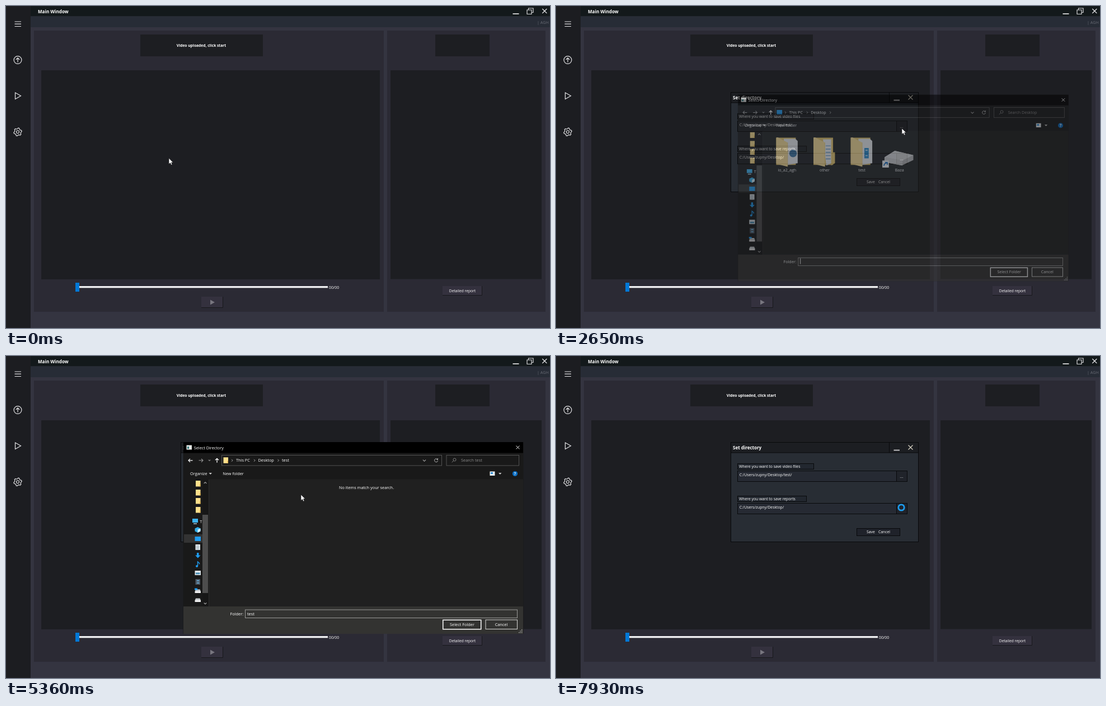
An HTML page for the animation above (8 s loop, 972 px wide and 576 px high).

```html
<!DOCTYPE html>
<html lang="en">
<head>
<meta charset="utf-8">
<title>Main Window</title>
<style>
html, body { margin: 0; width: 100%; height: 100%; overflow: hidden; background: #343440; }
svg { display: block; width: 100vw; height: 100vh; font-family: "Open Sans", "Noto Sans", sans-serif; }
</style>
</head>
<body>
<svg id="stage" viewBox="0 0 972 576"></svg>
<script>
const LOOP = 8000;

// Markup helpers
const rect = (x1, y1, x2, y2, fill, stroke = 'none') => {
  const o = stroke === 'none' ? 0 : 0.5;
  return `<rect x="${x1 + o}" y="${y1 + o}" width="${x2 - x1 - 2 * o}" height="${y2 - y1 - 2 * o}" fill="${fill}" stroke="${stroke}"/>`;
};
const line = (d, stroke, w = 1) => `<path d="${d}" fill="none" stroke="${stroke}" stroke-width="${w}"/>`;
const shape = (d, fill) => `<path d="${d}" fill="${fill}"/>`;
const text = (x, y, s, size = 6.8, fill = '#fff', extra = '') =>
  `<text x="${x}" y="${y + size * 0.36}" font-size="${size}" fill="${fill}" ${extra}>${s}</text>`;
const group = (id, body) => `<g id="${id}">${body}</g>`;
const BOLD = 'font-weight="700"', MID = 'text-anchor="middle"';
const cross = (x, y, r, c, w = 1) =>
  line(`M${x - r} ${y - r}l${2 * r} ${2 * r}M${x + r} ${y - r}l${-2 * r} ${2 * r}`, c, w);

function gear(x, y) {
  let d = '';
  for (let i = 0; i < 24; i++) {
    const a = (i + 0.5) * Math.PI / 12, r = i % 4 < 2 ? 7.2 : 5.6;
    d += `${i ? 'L' : 'M'}${(x + r * Math.sin(a)).toFixed(2)} ${(y - r * Math.cos(a)).toFixed(2)}`;
  }
  return line(d + 'Z', '#e4e4e6', 1.2) + `<circle cx="${x}" cy="${y}" r="2.5" fill="none" stroke="#e4e4e6" stroke-width="1.1"/>`;
}

function mainWindow() {
  const dark = '#1d1e22', panel = '#2b2a34', icon = '#e4e4e6';
  const button = (x1, y1, x2, y2) => rect(x1, y1, x2, y2, '#34313e') +
    line(`M${x1} ${y2 - 0.5}H${x2 - 0.5}V${y1}`, '#17171b');
  return rect(0, 0, 972, 576, '#343440') +
    rect(0, 0, 44, 576, '#1c1d21') +
    rect(44, 0, 972, 18.5, '#13191b') +
    rect(44, 18.5, 972, 38, '#272c36') +
    rect(50, 44, 675, 547, panel) + rect(681, 44, 964, 547, panel) +
    rect(240, 51, 459, 90, dark) + rect(767, 51, 864, 90, dark) +
    rect(63, 115, 668, 489, dark) + rect(687, 115, 957, 488.5, dark) +
    text(57, 9.7, 'Main Window', 8.05, '#fff', BOLD) +
    text(349, 70.7, 'Video uploaded, click start', 6.7, '#fff', BOLD + MID) +
    text(949, 29, '| AGH', 7.2, '#686b74') +
    line('M905.5 14H916.5', '#d8d8da', 1.8) +
    line('M931 7h8v7.500h-8zM933.500 7v-3h8.500v7.500h-3', '#d8d8da', 1.2) +
    cross(962.3, 9, 4, '#e4e4e6', 1.2) +
    line('M15.500 28h11.500M15.500 32.200h11.500M15.500 36.500h11.500', icon, 1.2) +
    `<circle cx="21" cy="96.500" r="6.900" fill="none" stroke="${icon}" stroke-width="1.200"/>` +
    line('M21 100.500v-7.500M17.800 96l3.200-3.200 3.200 3.200', icon, 1.2) +
    line('M16.500 155v11.500l10-5.700z', icon, 1.2) + gear(21, 225.3) +
    rect(127, 501, 575, 504.3, '#f0f0f2') + rect(124, 495, 131, 511, '#0078d7') +
    text(577, 503.2, '00/00') +
    button(349, 520, 388, 540) + shape('M365 525.500v9l8-4.500z', '#78767f') +
    button(780, 501, 851, 518) + text(815.5, 509.8, 'Detailed report', 6.7, '#fff', MID);
}

function settingsDialog() {
  const pathRow = (y, label, w, path) =>
    rect(324, y - 13, 324 + w, y - 2, '#22272f', '#08090b') + text(327, y - 7.3, label) +
    rect(324, y, 609, y + 20, '#262a33', '#08090b') + text(327.7, y + 8, path) +
    rect(608, y, 628, y + 20, '#20232a', '#08090b') + text(617.5, y + 10, '...', 8, '#ddd', MID);
  return rect(312, 154, 648, 333, '#282d34', '#08090b') +
    rect(312, 154, 648, 173.5, '#1c1e22', '#08090b') + line('M595.5 154V173', '#08090b') +
    text(316, 164, 'Set directory', 8, '#fff', BOLD) +
    line('M603.500 168.500h10.500', '#d0d0d2', 1.8) + cross(633.5, 163.5, 4, '#ded8c8', 1.1) +
    pathRow(205, 'Where you want to save video files', 137, 'C:/Users/zupny/Desktop/test/') +
    pathRow(263, 'Where you want to save reports', 124, 'C:/Users/zupny/Desktop/') +
    rect(537, 308, 615, 322, '#1f222a', '#08090b') +
    text(555, 315, 'Save') + text(576, 315, 'Cancel');
}

const smallFolder = (x, y) => rect(x - 4, y - 5, x + 4.5, y + 5.5, '#ffe08c') + rect(x + 3, y + 1, x + 4.5, y + 5.5, '#e0b44c');

// Open folder with papers; x is its left edge
const bigFolder = (x, inner) => shape(`M${x} 233h36v50h-36z`, '#e9c667') + inner +
  shape(`M${x} 233l3-.5 18 9.500v44.500l-21-5.500z`, '#ffe297') +
  line(`M${x + 21} 242v44`, '#f0cd74', 0.8);
const paper = x => shape(`M${x + 14} 235h21l4.500 4v41l-25 4z`, '#f4f5f6');

function treeIcons() {
  const blue = '#1f9cf0', pale = '#dfe6ea';
  const drive = y => shape(`M339 ${y - 2.5}h7.500l1.500 3.500h-10.500z`, '#c9cdd0') + rect(337.5, y + 1, 348, y + 4, '#f0f0f0');
  return [228, 244, 259, 275].map(y => smallFolder(343, y)).join('') +
    rect(333, 291, 343, 298, '#3db4f5') + line('M335 300h6', '#b9d9ea', 1.4) + text(346.3, 296, 'T', 7.3) +
    shape('M337.500 308.500l5-2.500 5 2.500v5l-5 2.500-5-2.500z', '#35aeea') + shape('M342.500 310.500l5-2v5l-5 2.500z', '#d5f2ff') +
    rect(318, 319, 351, 334, '#333') + rect(337.5, 323, 348, 331, blue) +
    rect(338.5, 337, 347, 347, pale) + line('M340 340h5M340 342.500h5M340 345h5', '#7d93a0', 0.8) +
    shape('M341 352h3.500v4.500h3l-4.700 5-4.700-5h2.900z', blue) +
    line('M342.500 376v-8l3 2.500v2', blue, 1.4) + `<circle cx="341" cy="376" r="2" fill="${blue}"/>` +
    rect(337.5, 384, 348, 392, pale) + rect(339, 387.5, 346.5, 390.5, '#4a90b8') +
    rect(338.5, 399, 347, 409, '#4e5a66') + line('M341 402h4M341 406h4', '#6cb8e6', 1.6) +
    drive(420) + shape('M337 415.500h5v3h-5z', blue) + drive(436);
}

function driveIcon() {
  return shape('M586 269l19-12 34 8v9l-21 10-32-6z', '#b9b9b9') +
    shape('M586 269l19-12 34 8-20 10z', '#dedede') + shape('M586 269l33 6v9l-33-6z', '#cfcfcf') +
    rect(582, 275, 594, 288, '#f5f7f9') + line('M585 285c0-4 2-5 5-5.500M587 278.500h4.200v4.200', '#1470c8', 1.6);
}

function fileDialog() {
  const s = 7.35, chev = (x, y) => line(`M${x - 1} ${y - 2}l2 2-2 2`, '#bbb', 0.9);
  const down = (x, y, r, c) => line(`M${x - r} ${y - r / 2}l${r} ${r} ${r}-${r}`, c, 1.1);
  const caption = (x, label) => text(x, 293, label, s, '#fff', MID);
  return rect(316.5, 154, 924.5, 497, '#191919') +
    rect(317, 154, 924, 173.5, '#000') +
    rect(363, 220.5, 924, 448, '#202020') + line('M362.500 221V448', '#2c2c2c') +
    rect(317, 448, 924, 497, '#333331') +
    group('chrome', rect(322.5, 159.5, 332, 167.5, '#e4e6e4') + rect(324, 162, 327, 166, '#3c7f80') + cross(914.5, 163.5, 2.9, '#fff')) +
    `<text id="heading" y="166.600" font-size="7.300" fill="#fff">Select Directory</text>` +
    `<path id="back" d="M333.500 186.800h-7.500m3-3l-3 3 3 3" fill="none" stroke-width="1.200"/>` +
    line('M344.500 186.800h7.500m-3-3l3 3-3 3', '#9a9a9a', 1.1) + down(363.5, 186.5, 1.8, '#888') +
    line('M377 190.800v-7.500m-3 3l3-3 3 3', '#fff', 1.3) +
    rect(385, 177, 779, 196.5, '#191919', '#535353') + rect(786.5, 177, 917, 196.5, '#191919', '#535353') +
    group('crumbHover', rect(446, 178, 482, 195.5, '#3a3a3a')) +
    chev(404, 186.8) + text(411, 186.5, 'This PC', s) + chev(444, 186.8) +
    text(450.5, 186.5, 'Desktop', s) + chev(486.5, 186.8) +
    down(747.5, 187, 2.6, '#aaa') +
    line('M771 184.900a3 3 0 1 0 .6 2.200M771.500 183v2.300h-2.300', '#c8c8c8', 0.9) +
    '<circle cx="801.500" cy="185.500" r="2.500" fill="none" stroke="#888" stroke-width=".9"/>' + line('M799.700 187.300l-3 3', '#888', 0.9) +
    text(329, 210.5, 'Organize', s) + shape('M362.500 209h5.500l-2.750 3z', '#ccc') + text(387.3, 210.5, 'New folder', s) +
    rect(864.5, 206.5, 873.5, 214, '#e8eef2') + rect(866, 208, 870, 211, '#2f8fd8') + shape('M880 209h5.500l-2.750 3z', '#ccc') +
    '<circle cx="909.500" cy="210.500" r="4.600" fill="#0b6fc4"/>' + text(909.5, 210.5, '?', 7, '#fff', BOLD + MID) +
    treeIcons() +
    rect(351, 221, 361.5, 448, '#171717') + rect(351, 284, 361, 424, '#4d4d4d') +
    line('M353.700 228l2.300-2.300 2.300 2.300M353.700 441.500l2.300 2.300 2.300-2.300', '#aaa', 1.1) +
    group('desktopView',
      rect(388, 182, 398, 190, '#1f9cf0') + text(813, 186.5, 'Search Desktop', s, '#8c8c8c') +
      group('itemHover', rect(511, 228, 578, 300, '#3b3b3b')) +
      bigFolder(387, paper(387) + '<circle cx="418" cy="262" r="7" fill="#3f78a8"/>') + caption(407, 'io_a2_agh') +
      bigFolder(455.5, shape('M473 236h16v44l-10 4z', '#f3f5f7') +
        line('M478 248h9M478 254h9M478 260h9M478 266h9M478 272h9', '#6d9fc8', 1.4) + shape('M488 236l3 2v22h4v20l-7 4z', '#f1cf70')) + caption(476, 'other') +
      bigFolder(524, paper(524) + rect(549, 252, 557, 271, '#2a8fd0') + line('M551 256h4M551 266h4', '#e9f4fb', 1.5)) + caption(544.5, 'test') +
      driveIcon() + caption(613.5, 'Baza')) +
    group('testView',
      smallFolder(392.5, 186.3) + text(493, 186.5, 'test', s) + text(813, 186.5, 'Search test', s, '#8c8c8c') +
      text(644, 235.5, 'No items match your search.', s, '#fff', MID)) +
    text(400.5, 461.5, 'Folder:', s) + rect(427, 453.5, 914, 469, '#333331', '#9a9a98') +
    group('folderName', text(431, 461, 'test', s)) + group('caret', rect(431, 455, 432, 465.5, '#fff')) +
    '<rect id="select" x="780.750" y="472.250" width="68" height="16.500" stroke="#fff" stroke-width="1.500"/>' +
    text(815, 480, 'Select Folder', s, '#fff', MID) +
    rect(856.5, 471.5, 914, 489, '#333331', '#d8d8d6') + text(885, 480, 'Cancel', s, '#fff', MID) +
    [[921, 490], [921, 492.5], [918.5, 492.5], [921, 495], [918.5, 495], [916, 495]].map(([x, y]) => rect(x, y - 1, x + 1.4, y + 0.4, '#aaa')).join('');
}

document.getElementById('stage').innerHTML = mainWindow() +
  group('settings', settingsDialog()) + group('files', fileDialog()) +
  group('arrow', '<path d="M0 0V10.500L2.500 8.300L4.200 12L6 11.200L4.400 7.600H7.600Z" fill="#fff" stroke="#16171a" stroke-width=".6"/>') +
  group('beam', line('M-2.500-5.500H-.6L0-5L.6-5.500H2.500M0-5V5M-2.500 5.500H-.6L0 5L.6 5.500H2.500', '#d8d8d8')) +
  group('ring', '<circle cx="617" cy="271" r="5.200" fill="#20232a" stroke="#1c9cee" stroke-width="2.800"/>');

const el = {};
document.querySelectorAll('[id]').forEach(n => el[n.id] = n);
const show = (id, on) => el[id].setAttribute('display', on ? 'inline' : 'none');

// Progress made in n hard steps, the first at t0 and the last at t1
const steps = (t, t0, t1, n) => {
  if (t < t0) return 0;
  const gap = n > 1 ? (t1 - t0) / (n - 1) : 1;
  return Math.min(n, Math.floor((t - t0) / gap + 0.12) + 1) / n;
};
const smooth = u => u * u * (3 - 2 * u);
const out = u => 1 - (1 - u) ** 1.81;

const START = [291, 272.3];
const MOVES = [
  [70, 690, 9, 25, 236, smooth],
  [920, 1080, 3, 28, 236, smooth],
  [1310, 2100, 11, 608, 221, out],
  [2180, 2330, 3, 618, 219, smooth],
  [3420, 4190, 11, 464, 190, smooth],
  [4260, 4260, 1, 469, 191, smooth],
  [4740, 5050, 5, 527, 248, smooth],
  [5520, 6290, 11, 795, 489, smooth],
  [6370, 6370, 1, 795, 482, smooth],
  [6840, 7610, 11, 609, 263, smooth],
  [7760, 7760, 1, 617, 267, smooth]
];

function cursorAt(t) {
  let [x, y] = START;
  for (const [t0, t1, n, tx, ty, ease] of MOVES) {
    const u = ease(steps(t, t0, t1, n));
    x += (tx - x) * u;
    y += (ty - y) * u;
  }
  return [x, y];
}

// Fades a window while it scales about its centre
function pop(id, u, cx, cy) {
  show(id, u > 0);
  const k = 0.945 + 0.055 * u;
  el[id].setAttribute('opacity', u);
  el[id].setAttribute('transform', `translate(${cx} ${cy}) scale(${k}) translate(${-cx} ${-cy})`);
}

function update(t) {
  const closing = t >= 6520, opened = t >= 5210;
  pop('settings', steps(t, 920, 1080, 3), 480, 243.5);
  pop('files', t < 6600 ? steps(t, 2500, 2880, 6) : t < 6690 ? 0.45 : 0, 620.5, 325.5);

  show('chrome', !closing);
  el.heading.setAttribute('x', closing ? 322 : 335.7);
  el.back.setAttribute('stroke', opened ? '#fff' : '#9a9a9a');
  show('desktopView', !opened);
  show('testView', opened);
  show('folderName', t >= 5130);
  show('caret', t < 3190 || (t >= 3720 && t < 4190));

  const [x, y] = cursorAt(t), over = (x1, y1, x2, y2) => x >= x1 && x <= x2 && y >= y1 && y <= y2;
  show('crumbHover', over(446, 178, 482, 195));
  show('itemHover', over(511, 228, 578, 300) && t > 4740);
  el.select.setAttribute('fill', over(780, 471, 849, 490) ? '#666664' : '#333331');

  const busy = t >= 7930;
  const typing = !busy && t > 1310 && t < 2180 && over(325, 205, 608.5, 229);
  show('ring', busy);
  show('beam', typing);
  show('arrow', !busy && !typing);
  for (const id of ['arrow', 'beam']) el[id].setAttribute('transform', `translate(${x.toFixed(1)} ${y.toFixed(1)})`);
}

const begin = performance.now();
function tick() {
  update((performance.now() - begin) % LOOP);
  requestAnimationFrame(tick);
}
tick();
</script>
</body>
</html>
```
